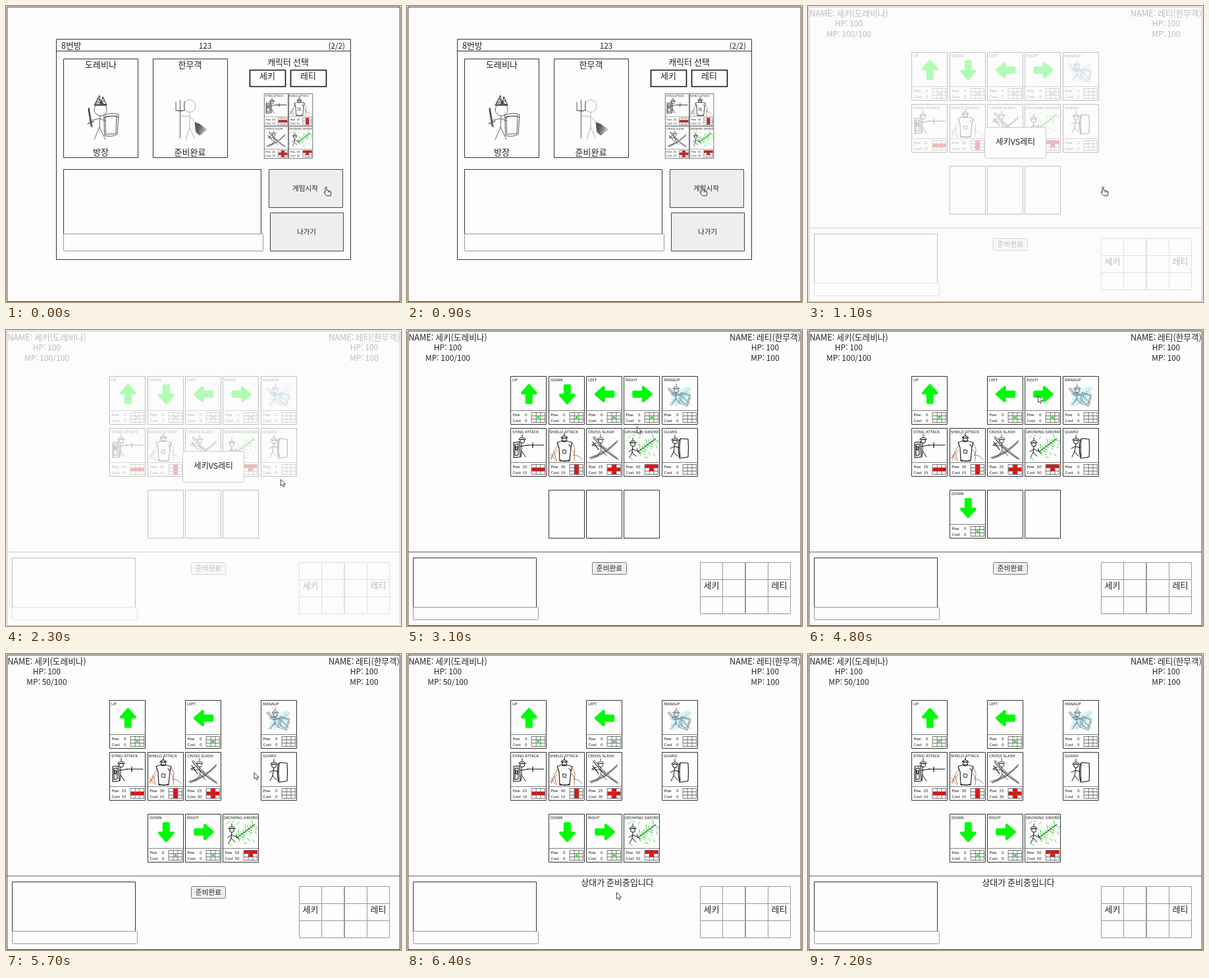
Recreate the animation shown at these times as an HTML page with a canvas. Size 600 by 450 pixels, loop 8 s.

```html
<!DOCTYPE html>
<html lang="ko">
<head>
<meta charset="utf-8">
<style>
html, body { margin: 0; width: 100%; height: 100%; overflow: hidden; background: #fefdfe; }
canvas { display: block; }
</style>
</head>
<body>
<canvas width="600" height="450"></canvas>
<script>
const canvas = document.querySelector('canvas');
const ctx = canvas.getContext('2d');
const LOOP = 8000, STEP = 100;
const PAPER = '#fefdfe', INK = '#333', GREY = '#999', GREEN = '#00fa0a', RED = '#f80808';
const UI = '"Noto Sans CJK KR", "Noto Sans CJK", "Noto Sans CJK JP", sans-serif';
const SMALL = '"DejaVu Sans", sans-serif';
const PLAYERS = ['도레비나', '한무객'];

function text(str, x, y, size = 13, align = 'center', font = UI) {
  ctx.font = `${size}px ${font}`;
  ctx.textAlign = align;
  ctx.fillStyle = '#222';
  ctx.fillText(str, x, y + size * 0.36);
}

function box(x, y, w, h, stroke = INK, fill = null, radius = 0, width = 1) {
  ctx.beginPath();
  ctx.roundRect(x + 0.5, y + 0.5, w, h, radius);
  if (fill) { ctx.fillStyle = fill; ctx.fill(); }
  ctx.strokeStyle = stroke;
  ctx.lineWidth = width;
  ctx.stroke();
}

function sketch(d, color = '#111', width = 1, fill = null) {
  const path = new Path2D(d);
  if (fill) { ctx.fillStyle = fill; ctx.fill(path); }
  ctx.strokeStyle = color;
  ctx.lineWidth = width;
  ctx.lineJoin = ctx.lineCap = 'round';
  ctx.stroke(path);
  ctx.lineJoin = 'miter';
  ctx.lineCap = 'butt';
}

function at(x, y, scale, draw, turn = 0) {
  ctx.save();
  ctx.translate(x, y);
  ctx.rotate(turn * Math.PI / 2);
  ctx.scale(scale, scale);
  draw();
  ctx.restore();
}

const head = (x, y) =>
  `M${x - 5} ${y - 3}q5 -6 10 0zm5 -4v-3M${x - 3.5} ${y}a3.5 3 0 1 0 7 0a3.5 3 0 1 0 -7 0`;

const zigzag = (n, point) =>
  'M' + Array.from({ length: n }, (_, i) => point(i).map(v => v.toFixed(1)).join(' ')).join('L');

const arrow = () => sketch('M0 -13.5L10.5 -1.5H3.5V13H-3.5V-1.5H-10.5Z', GREEN, 4, GREEN);

const art = {
  manaup() {
    sketch(zigzag(30, i => [28 + 17 * Math.sin(i * 2.3), 31 + 15 * Math.sin(i * 3.7 + 1)]), '#a4e2ea', 0.8);
    sketch(head(22, 22) + 'M22 25L21 35 15 44M21 35l7 7M9 19L18 30 30 28M11 18l9 11M15 27q6 -4 13 2', '#667', 1);
    sketch('M30 25L44 29 39 46 26 41ZM32 27l10 3 -4 13 -9 -4zM31 30l9 10M29 36l6 7', '#78838a', 0.9);
  },
  sting() {
    sketch('M5 22L14 21 15 44 5 45ZM7 25L12 24V41L7 42ZM8 28l3 1 -1 5 -2 -2z', '#111', 1.1);
    sketch(head(18, 20) + 'M17 23V35L16 44M17 35L23 44M15 28L27 26');
    sketch('M26 26H51M34 22.5V30', '#111', 1.2);
  },
  shield() {
    sketch('M14 27Q7 35 4 48M13 34Q9 41 2 46M36 24Q43 32 38 42Q45 40 51 48M35 33Q41 36 39 50M9 37L12 50M3 40q4 2 6 8', '#b06a40', 0.9);
    sketch(head(24, 18) + 'M13 22Q23 17 36 22L34 29 32 50 17 50 16 30ZM16 30l-2 -5M34 29l-3 -4M18 49q7 3 13 0', '#111', 1.1);
    sketch('M22 33l5 1 -1 5 -4 -1z', '#111', 0.9);
  },
  cross() {
    sketch('M11 13Q23 33 49 48M13 13Q28 32 48 46M48 19Q30 38 5 45M47 22Q28 41 8 47M40 27L12 44', '#aaa', 1.6);
    sketch(head(22, 20) + 'M22 23L23 34 16 44M23 34L31 42M10 27L22 27 30 32M11 15L25 31 47 47M47 20L30 36 7 46', '#333', 0.9);
    sketch('M10 21l9 12M9 26l6 -3', '#111', 1.2);
  },
  growing() {
    sketch(Array.from({ length: 8 }, (_, i) => {
      const x = 22 + i * 3.4, y = 36 - i * 2.6, r = 6 + 3 * Math.sin(i * 1.9);
      return `M${x} ${y}l${-r * 0.2} ${-r}M${x} ${y}l${r} ${r * 0.35}m-3 2l1 2`;
    }).join(''), '#30e236', 1);
    sketch('M7 15l4 -3M14 11l3 1M22 16l3 -3M10 46l4 2M45 39l3 4M32 44l5 1M38 37l3 4M23 24l2 3M50 27l1 4', '#3ce43c', 1);
    sketch(head(14, 25) + 'M14 28L13 37 9 45M13 37L19 43M8 36L14 32 22 36L49 16M20 32l5 7', '#111', 1);
  },
  guard() {
    sketch(head(20, 21) + 'M20 24L18 36 14 44M18 36L24 43M13 31L19 28 27 30');
    sketch('M26 19L29 16 40 17Q41 30 40 44L27 46Q24 33 26 19ZM28 18Q26 31 28 44', '#111', 1.1);
  }
};

// name, power, cost, highlighted grid cells, artwork or number of quarter turns
const CARDS = [
  ['UP', 0, 0, [], 0], ['DOWN', 0, 0, [], 2], ['LEFT', 0, 0, [], 3], ['RIGHT', 0, 0, [], 1],
  ['MANAUP', 0, 0, [], art.manaup],
  ['STING ATTACK', 25, 15, [3, 4, 5], art.sting],
  ['SHIELD ATTACK', 30, 15, [1, 4, 7], art.shield],
  ['CROSS SLASH', 25, 30, [1, 3, 4, 5, 7], art.cross],
  ['GROWING SWORD', 50, 50, [0, 1, 2, 4], art.growing],
  ['GUARD', 0, 0, [], art.guard]
];

function card(index, x, y, scale = 1) {
  const [name, pow, cost, cells, picture] = CARDS[index];
  at(x, y, scale, () => {
    box(0, 0, 54, 73, INK, PAPER);
    sketch('M0 52.5H54', '#666', 0.8);
    text(name, name.length > 12 ? 1.5 : 3, 6, 5.65, 'left', SMALL);
    [['Pow', pow, 58.5], ['Cost', cost, 68]].forEach(([label, value, row]) => {
      text(label, 3.5, row, 5.6, 'left', SMALL);
      text(value, 25.5, row, 5.6, 'right', SMALL);
    });
    ctx.fillStyle = RED;
    cells.forEach(c => ctx.fillRect(32.5 + c % 3 * 6.7, 55.5 + Math.floor(c / 3) * 5, 6.7, 5));
    sketch('M32.5 55.5h20v15h-20zm0 5h20m-20 5h20M39.2 55.5v15m6.7 -15v15', '#555', 0.8);
    if (typeof picture === 'function') return picture();
    at(28.3, 27.5, 1, arrow, picture);
    at(42.5, 63, 0.18, arrow, picture);
  });
}

function room() {
  box(76, 50, 447, 335);
  sketch('M76 68.5H523', INK, 1);
  text('8번방', 84, 60, 12.7, 'left');
  text('123', 302.5, 60.5, 11.7);
  text('(2/2)', 515, 60.5, 11.7, 'right');
  box(87, 80, 113, 150);
  box(223, 80, 113, 150);
  text(PLAYERS[0], 144, 89);
  text('방장', 144, 222);
  text(PLAYERS[1], 279.5, 89);
  text('준비완료', 279.5, 222);

  // knight with sword and shield
  sketch('M134 151L142 136 144 150 147 138 153 151ZM136 148l14 -4M138 145l13 5M140 141l8 8M135 150h17', '#333', 1.1);
  sketch('M134 158a9 9 0 1 0 19 -1a9.5 9 0 1 0 -19 1M143 167L142 184 134 203M142 184L151 203M129 174L142 171 152 175', '#555', 0.9);
  sketch('M149 166Q160 161 171 165L169 195Q160 200 150 197ZM151 168L168 167 167 194 152 195ZM149 170q11 -5 22 -1', '#444', 0.9);
  sketch('M126 155L131 184M125 156L129 183M124 179l10 -4', '#333', 1.2);

  // fighter with trident and claw
  sketch('M270 152a9 9.5 0 1 0 18 0a9 9.5 0 1 0 -18 0M279 161V184L273 204M279 184L286 201M266 167L279 168 289 178', '#aaa', 0.9);
  sketch('M264.5 143V201M258 146v13h13v-14M258 158q7 4 13 0', '#666', 1.1);
  sketch(zigzag(22, i => i % 2 ? [288 + i * 0.8, 197 - Math.abs(i - 8) * 0.7] : [287 + i * 0.3, 177 + i * 0.1]), '#555', 0.9);

  text('캐릭터 선택', 428.5, 85);
  box(370, 97, 54, 25, '#111', null, 0, 1.6);
  box(432, 97, 54, 25, '#111', null, 0, 1.6);
  text('세키', 397, 106);
  text('레티', 459, 106);
  [5, 6, 7, 8].forEach((c, i) => card(c, 392 + i % 2 * 37.3, 133 + (i >> 1) * 49.5, 0.67));

  box(87, 248, 300, 98);
  box(87, 346, 303, 26, GREY, null, 1);
  box(399, 248, 112, 58, '#444', '#efedef');
  box(401, 314, 111, 58, '#444', '#efedef');
  text('게임시작', 454.5, 277, 10.6);
  text('나가기', 456.5, 343, 10.6);
}

const PICKS = [[1, 4300], [3, 5000], [8, 5500]];
const READY = 6100;
const column = i => Math.round(157.2 + i * 57.4);

function battle(t) {
  const slots = PICKS.filter(([, time]) => t >= time).map(([c]) => c);
  text(`NAME: 세키(${PLAYERS[0]})`, 62, 11, 12.7);
  text(`NAME: 레티(${PLAYERS[1]})`, 544, 11, 12.7);
  text('HP: 100', 62, 27, 12);
  text('HP: 100', 544, 27, 12);
  text(`MP: ${slots.includes(8) ? 50 : 100}/100`, 62, 43, 12);
  text('MP: 100', 544, 43, 12);

  CARDS.forEach((_, i) => {
    if (!slots.includes(i)) card(i, column(i % 5), i < 5 ? 70 : 149);
  });
  for (let i = 0; i < 3; i++) {
    if (i < slots.length) card(slots[i], column(i + 1), 243);
    else box(column(i + 1), 243, 54, 73);
  }

  sketch('M1 337.5H598', '#666', 1);
  box(9, 346, 187, 75);
  box(9, 421, 190, 19, GREY, null, 1);
  if (t < READY) {
    box(281, 353, 52, 18, '#767676', '#efefef', 2);
    text('준비완료', 307.5, 362, 10.7);
  } else {
    text('상대가 준비중입니다', 319.5, 347);
  }
  for (let i = 0; i < 12; i++) box(445 + Math.round(i % 4 * 34.3), 353 + Math.floor(i / 4) * 26, 34, 26, GREY);
  text('세키', 462.5, 388);
  text('레티', 565.5, 388);
}

function alertBox() {
  box(268, 184, 93, 47, '#ccc', PAPER, 4);
  text('세키VS레티', 315, 207, 12.4);
}

// time, x, y of the pointer tip
const TRACK = [
  [0, 486, 274], [100, 486, 274], [900, 448, 274], [2000, 448, 274], [2300, 417, 227],
  [2800, 349, 147], [3100, 349, 147], [3800, 242, 100], [4300, 242, 100], [4700, 349, 100],
  [5200, 349, 100], [5500, 350, 182], [5700, 376.5, 180], [5900, 312, 366], [6100, 312, 366],
  [6600, 322, 360], [6900, 322, 360], [7200, 535, 328]
];

function pointer(t) {
  const next = TRACK.findIndex(k => k[0] > t);
  if (next < 0) return;
  const [t0, x0, y0] = TRACK[next - 1], [t1, x1, y1] = TRACK[next];
  const p = (t - t0) / (t1 - t0);
  at(x0 + (x1 - x0) * p, y0 + (y1 - y0) * p, 1, () => {
    if (t < 2000) sketch('M-1 9V1.5q1 -2 2 0V6l5.5 1.5q1.5 .5 1.5 2.5l-1 4.5H1L-3 9.5q0 -2 2 -.5M3.5 7v2M6 7.5v2', '#222', 0.9, '#fff');
    else sketch('M0.5 0.5V10L2.7 8 4.3 11.5 6 10.7 4.5 7.4H7.3Z', '#333', 0.9, '#fff');
  });
}

function draw(t) {
  ctx.fillStyle = PAPER;
  ctx.fillRect(0, 0, 600, 450);
  box(1, 1, 597, 448);
  if (t < 1000) room();
  else battle(t);
  if (t >= 1000 && t < 3100) {
    ctx.fillStyle = 'rgba(254, 253, 254, 0.7)';
    ctx.fillRect(0, 0, 600, 450);
    alertBox();
  }
  pointer(t);
}

function tick() {
  draw(Math.floor(performance.now() % LOOP / STEP) * STEP);
  requestAnimationFrame(tick);
}
tick();
</script>
</body>
</html>
```
